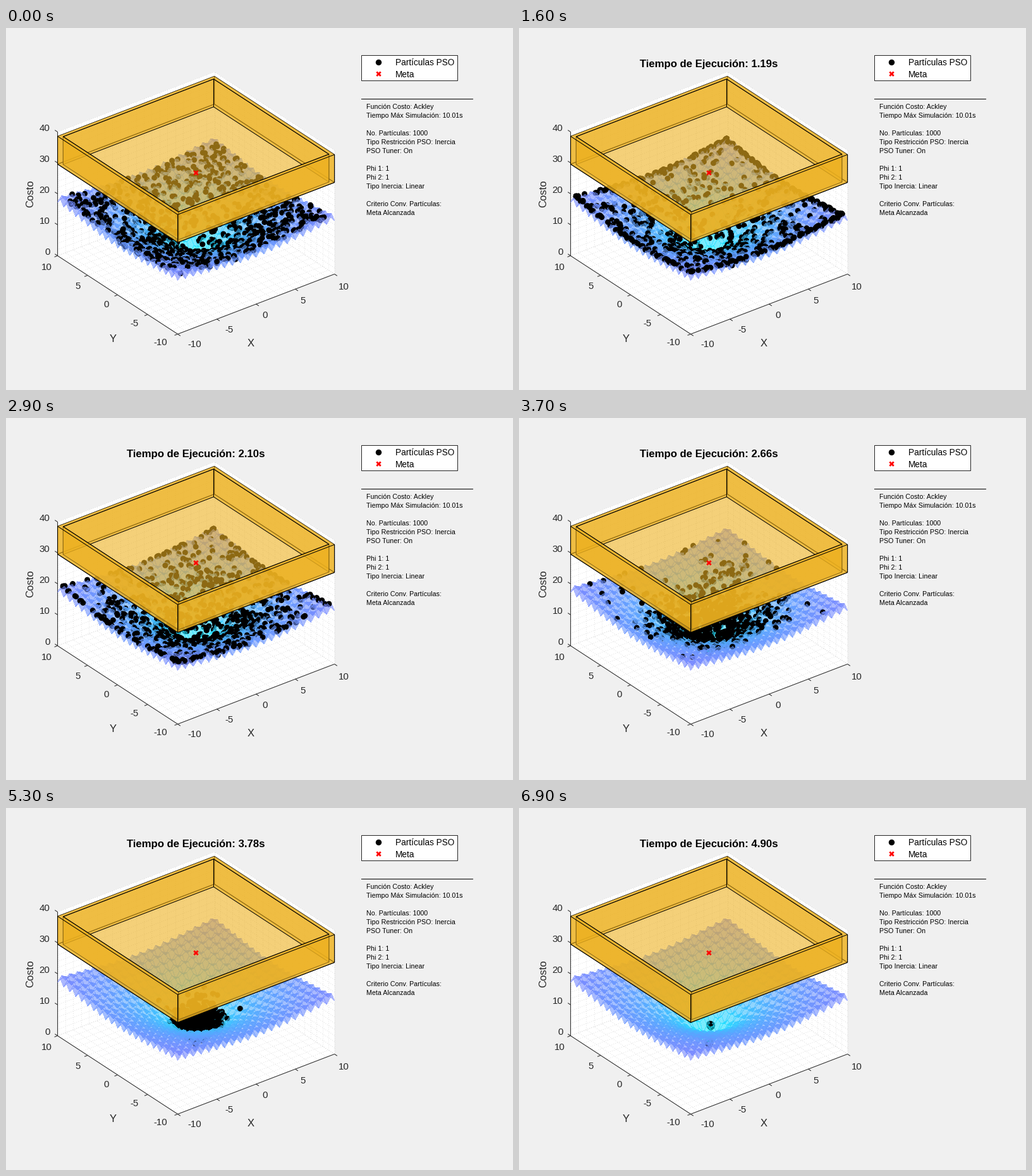
These frames come from a looping animation (802 px wide and 573 px high, 7000 ms). A matplotlib script:

```python
import numpy as np
import matplotlib.pyplot as plt
from matplotlib.animation import FuncAnimation
from matplotlib.collections import LineCollection, PolyCollection
from matplotlib.patches import Polygon, Rectangle

W, H, DPI = 802, 573, 100
FRAMES, INTERVAL = 70, 100
PX = 72 / DPI
INK = (0.15, 0.15, 0.15)
AMBER = (0.929, 0.694, 0.125, 0.6)
COUNT = 1000
LIMIT = 9.6  # half width of the area the particles may use

plt.rcParams["font.family"] = "Liberation Sans"
fig = plt.figure(figsize=(W / DPI, H / DPI), dpi=DPI, facecolor="#f0f0f0")
ax = fig.add_axes([0, 0, 1, 1])
ax.set(xlim=(0, W), ylim=(H, 0))
ax.axis("off")


def project(x, y, z):
    """Orthographic view: data coordinates to stage pixels."""
    return np.stack([300.6 + 12.4 * x - 9.5 * y,
                     375 - 4.75 * x - 6.2 * y - 4.9 * z], axis=-1)


def depth(x, y, z):
    """Larger values are nearer to the viewer."""
    return -8.25 * x - 10.7 * y + 2.83 * z


def ackley(x, y):
    bowl = 20 * (1 - np.exp(-0.2 * np.sqrt((x**2 + y**2) / 2)))
    waves = np.exp((np.cos(2 * np.pi * x) + np.cos(2 * np.pi * y)) / 2)
    return bowl + np.e - waves


def put(x, y, text, size, ha="center", color="k", **kw):
    """Text whose capitals are centred on y, size in pixels."""
    return ax.text(x, y + 0.36 * size, text, fontsize=size * PX, ha=ha,
                   va="baseline", color=color, zorder=6, **kw)


def points(*corners):
    return np.array([project(*np.array(c, float)) for c in corners])


def cross(x, y, r=3.2):
    for s in (1, -1):
        ax.plot([x - r, x + r], [y - s * r, y + s * r], color="r",
                lw=2.8 * PX, solid_capstyle="butt", zorder=5)


def draw_axes():
    hexagon = points((-10, 10, 0), (-10, -10, 0), (10, -10, 0),
                     (10, -10, 40), (10, 10, 40), (-10, 10, 40))
    ax.add_patch(Polygon(hexagon, fc="w", ec="none", zorder=0))

    grid = []
    for k in range(-10, 11):
        grid += [points((k, -10, 0), (k, 10, 0)),
                 points((k, 10, 0), (k, 10, 40)),
                 points((-10, k, 0), (10, k, 0)),
                 points((10, k, 0), (10, k, 40))]
    for k in range(0, 41, 2):
        grid += [points((-10, 10, k), (10, 10, k)),
                 points((10, -10, k), (10, 10, k))]
    ax.add_collection(LineCollection(grid, colors="0.82", linewidths=0.8 * PX,
                                     linestyles=(0, (1, 3)), zorder=1))

    lines = [points((-10, 10, 40), (-10, 10, 0), (-10, -10, 0), (10, -10, 0))]
    for k in range(-10, 11, 5):
        a, = points((-10, k, 0))
        b, = points((k, -10, 0))
        c, = points((-10, 10, 2 * k + 20))
        lines += [[a, a + (-5, 1.9)], [b, b + (4.3, 2.8)], [c, c + (-4.3, -2.8)]]
    ax.add_collection(LineCollection(lines, colors=[INK], linewidths=PX, zorder=1))

    size = 15
    for i in range(5):
        put(69.5, 354 - 49 * i, str(10 * i), size, "right", INK)
    y_spots = [(244, 497), (203, 467), (159, 437), (114, 408), (64, 378)]
    x_spots = [(298, 500), (353, 477), (410, 454), (470, 431), (534, 409)]
    for k, a, b in zip(range(-10, 11, 5), y_spots, x_spots):
        put(*a, str(k), size, color=INK)
        put(*b, str(k), size, color=INK)
    put(169, 491, "Y", 16.6, color=INK)
    put(387.5, 498, "X", 16.6, color=INK)
    ax.text(46.5, 262, "Costo", fontsize=16.6 * PX, rotation=90, ha="right",
            va="center", color=INK)


def draw_box():
    low, high, inner = 29.6, 38.6, 9.6

    def ring(r, z):
        return points((-r, -r, z), (r, -r, z), (r, r, z), (-r, r, z))

    def face(pts, ec="k"):
        ax.add_patch(Polygon(pts, fc=AMBER, ec=ec, lw=PX, zorder=3))

    def wall(r, side):
        bottom, top = ring(r, low), ring(r, high)
        j = (side + 1) % 4
        face([bottom[side], bottom[j], top[j], top[side]])

    front, right, back, left = range(4)
    face(ring(10, low))
    for r in (10, inner):
        wall(r, right)
        wall(r, back)
    wall(inner, front)
    wall(inner, left)
    outer_top, inner_top = ring(10, high), ring(inner, high)
    face(np.vstack([outer_top, outer_top[:1], inner_top[:1], inner_top[::-1]]),
         ec="none")
    wall(10, front)
    wall(10, left)
    ax.add_patch(Polygon(inner_top, fc="none", ec="k", lw=PX, zorder=3))


def draw_info():
    ax.add_patch(Rectangle((562, 43), 152, 40, fc="w", ec=INK, lw=PX))
    ax.plot(589, 54, "o", color="k", ms=9.4 * PX, mew=0)
    cross(589.5, 72.7)
    put(616, 54.5, "Partículas PSO", 13.6, "left")
    put(616, 73.5, "Meta", 13.6, "left")
    ax.plot([562, 738], [112, 112], color="k", lw=PX)
    info = ["Función Costo: Ackley", "Tiempo Máx Simulación: 10.01s", "",
            "No. Partículas: 1000", "Tipo Restricción PSO: Inercia",
            "PSO Tuner: On", "", "Phi 1: 1", "Phi 2: 1",
            "Tipo Inercia: Linear", "", "Criterio Conv. Partículas:",
            "Meta Alcanzada"]
    for i, line in enumerate(info):
        put(570, 124.5 + 14 * i, line, 10.67, "left")


draw_axes()
draw_box()
draw_info()
cross(300.5, 229.3)
title = put(300.5, 56, "", 16.7, weight="bold")

# Translucent cost surface
u = np.linspace(-10, 10, 41)
gx, gy = np.meshgrid(u, u)
gz = ackley(gx, gy)


def cells(g):
    return np.stack([g[:-1, :-1], g[:-1, 1:], g[1:, 1:], g[1:, :-1]], -1).reshape(-1, 4)


qx, qy, qz = cells(gx), cells(gy), cells(gz)
quads = np.repeat(project(qx, qy, qz), 3, axis=1)
quad_depth = depth(qx, qy, qz).mean(axis=1)
quad_rgba = plt.get_cmap("cool")(qz.mean(axis=1) / 40)
quad_rgba[:, 3] = 0.6

# Swarm: each particle swings around its home while the spread changes
rng = np.random.default_rng(7)
swing_a, swing_b = rng.uniform(-1, 1, (2, COUNT, 2))
speed = rng.normal(1.05, 0.12, (COUNT, 2))
gain = rng.gamma(8, 1 / 8, (COUNT, 1))
home = np.where(rng.random((COUNT, 1)) < 0.6, 0.0, 1.0)
KEYS = [0, 4, 9, 16, 23, 30, 37, 41, 48, 53, 60, 69]
SPREAD = [LIMIT, 9, 4.6, 15.5, 10, 9, 5, 6.5, 2.6, 1.6, 0.9, 0.08]

angle = np.arange(12) * np.pi / 6
disc = 4.5 * np.stack([np.cos(angle), np.sin(angle)], axis=-1)
rgba = np.vstack([quad_rgba, np.tile([0, 0, 0, 1.0], (COUNT, 1))])
smooth = np.arange(len(rgba)) >= len(quads)
scene = PolyCollection([], linewidths=0, edgecolors="none", zorder=2)
ax.add_collection(scene, autolim=False)


def swarm(i):
    swing = swing_a * np.cos(speed * i) + swing_b * np.sin(speed * i)
    settle = min(i / 9, 1)
    tail = 1 + settle * (gain - 1)
    pos = np.interp(i, KEYS, SPREAD) * tail * swing + settle * home
    return np.clip(pos, -LIMIT, LIMIT).T


def update(i):
    x, y = swarm(i)
    z = ackley(x, y)
    dots = project(x, y, z)[:, None] + disc
    order = np.argsort(np.concatenate([quad_depth, depth(x, y, z) + 1.5]))
    scene.set_verts(np.concatenate([quads, dots])[order])
    scene.set_facecolor(rgba[order])
    scene.set_antialiased(smooth[order].tolist())
    title.set_text(f"Tiempo de Ejecución: {0.07 * (i + 1):.2f}s" if i else "")
    return scene, title


anim = FuncAnimation(fig, update, frames=FRAMES, interval=INTERVAL,
                     init_func=lambda: (scene, title), repeat=True)
plt.show()
```
